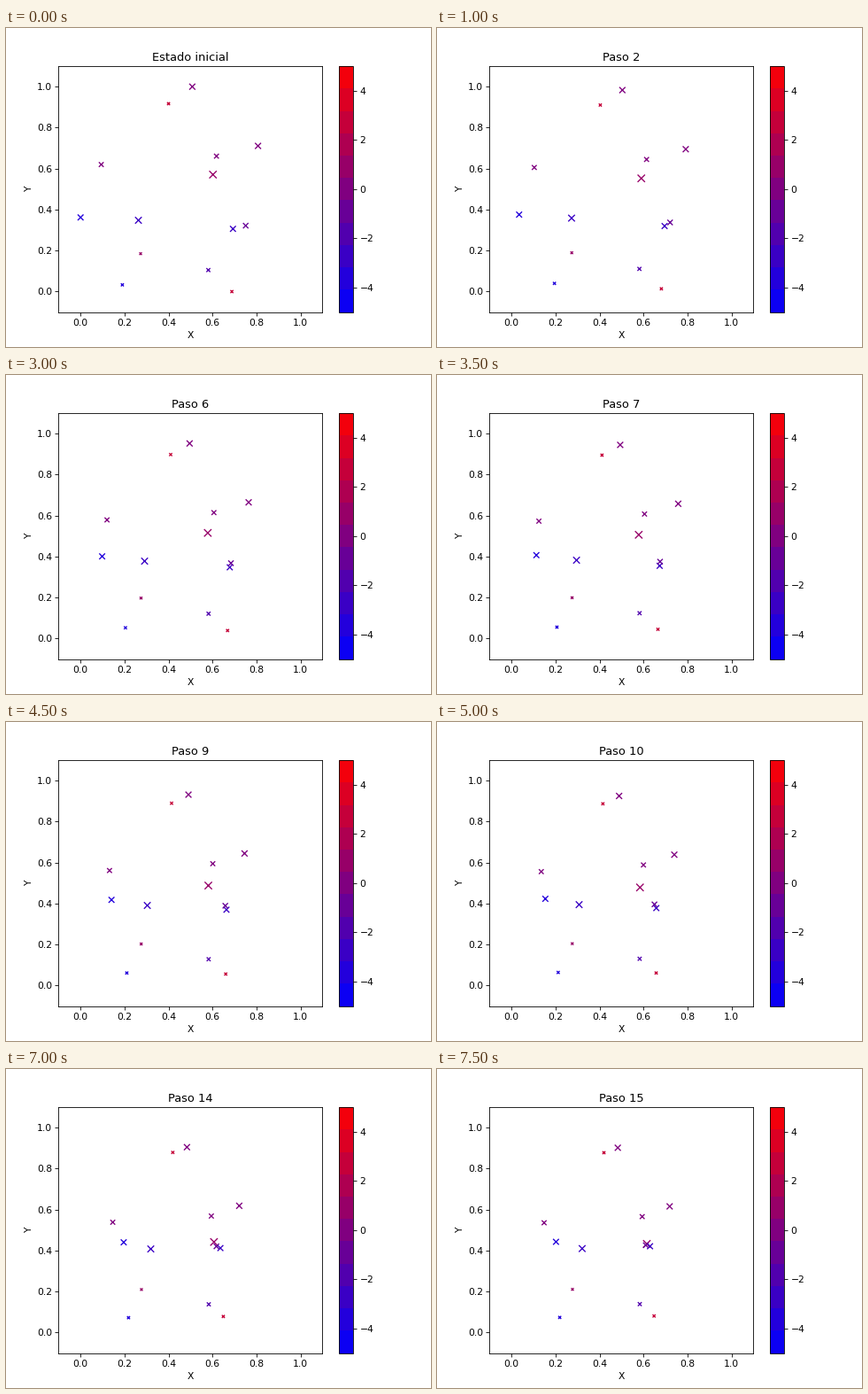
A matplotlib script for the animation above (8000 ms loop, 480 by 360 pixels).

```python
import numpy as np
import matplotlib.pyplot as plt
from matplotlib.animation import FuncAnimation
from matplotlib.colors import LinearSegmentedColormap

W, H, DPI = 480, 360, 75
STEPS, INTERVAL = 16, 500
LEVELS = 11

# Positions are complex numbers x + yj: start, total drift, charge, marker size
FREE = [
    (0.508 + 1.000j, -0.025 - 0.098j, 0.0, 6.5),
    (0.400 + 0.917j, 0.020 - 0.039j, 2.5, 3.2),
    (0.094 + 0.620j, 0.054 - 0.084j, 0.0, 5.2),
    (0.618 + 0.661j, -0.024 - 0.095j, 0.0, 5.2),
    (0.807 + 0.711j, -0.088 - 0.095j, 0.0, 6.5),
    (0.000 + 0.362j, 0.202 + 0.081j, -4.0, 6.3),
    (0.263 + 0.348j, 0.058 + 0.062j, -2.5, 7.2),
    (0.273 + 0.185j, 0.004 + 0.026j, 0.9, 2.8),
    (0.190 + 0.033j, 0.029 + 0.041j, -4.0, 3.2),
    (0.581 + 0.105j, 0.002 + 0.034j, -2.0, 4.2),
    (0.688 + 0.000j, -0.040 + 0.081j, 2.5, 3.2),
]
start, drift, charge, size = map(list, zip(*FREE))
charge += [0.5, -3, -1]  # heavy particle, then the orbiting pair
size += [8, 6.3, 5.8]


def positions(step):
    u = step / (STEPS - 1)
    ease = 1 - (1 - u) ** 1.3
    free = np.array(start) + ease * np.array(drift)

    heavy = 0.602 + 0.571j + u * (0.013 - 0.138j) - 0.12 * u * (1 - u)

    # Two particles circle a moving centre and close in on each other
    centre = 0.722 + 0.314j + u * (-0.102 + 0.110j)
    radius = 0.01 + 0.02 * np.exp(-step / 1.5)
    arm = radius * np.exp(1j * np.radians(195 + 10 * step))

    z = np.append(free, [heavy, centre + arm, centre - arm])
    return np.column_stack([z.real, z.imag])


def pixel_axes(x, y, w, h):
    return fig.add_axes([x / W, y / H, w / W, h / H])


edge = 0.5 / LEVELS
cmap = LinearSegmentedColormap.from_list(
    "charge", [(edge, 0, 1 - edge), (1 - edge, 0, edge)], N=LEVELS)

plt.rcParams.update({"font.family": "DejaVu Sans", "font.size": 10.3,
                     "axes.titlesize": 12.5})
fig = plt.figure(figsize=(W / DPI, H / DPI), dpi=DPI, facecolor="white")
ax = pixel_axes(59.4, 39.4, 298, 277.5)
cax = pixel_axes(376.2, 39.4, 16, 277.5)

points = ax.scatter(*positions(0).T, s=np.square(size), c=charge, marker="x",
                    cmap=cmap, vmin=-5, vmax=5, linewidths=1.3)
ticks = np.arange(0, 1.1, 0.2)
ax.set(xlim=(-0.1, 1.1), ylim=(-0.1, 1.1), xlabel="X", ylabel="Y",
       xticks=ticks, yticks=ticks)
title = ax.set_title("Estado inicial")
fig.colorbar(points, cax=cax, ticks=range(-4, 5, 2))


def update(step):
    points.set_offsets(positions(step))
    title.set_text(f"Paso {step}" if step else "Estado inicial")
    return points, title


anim = FuncAnimation(fig, update, frames=STEPS, interval=INTERVAL,
                     repeat=True, repeat_delay=0, blit=False)
plt.show()
```
